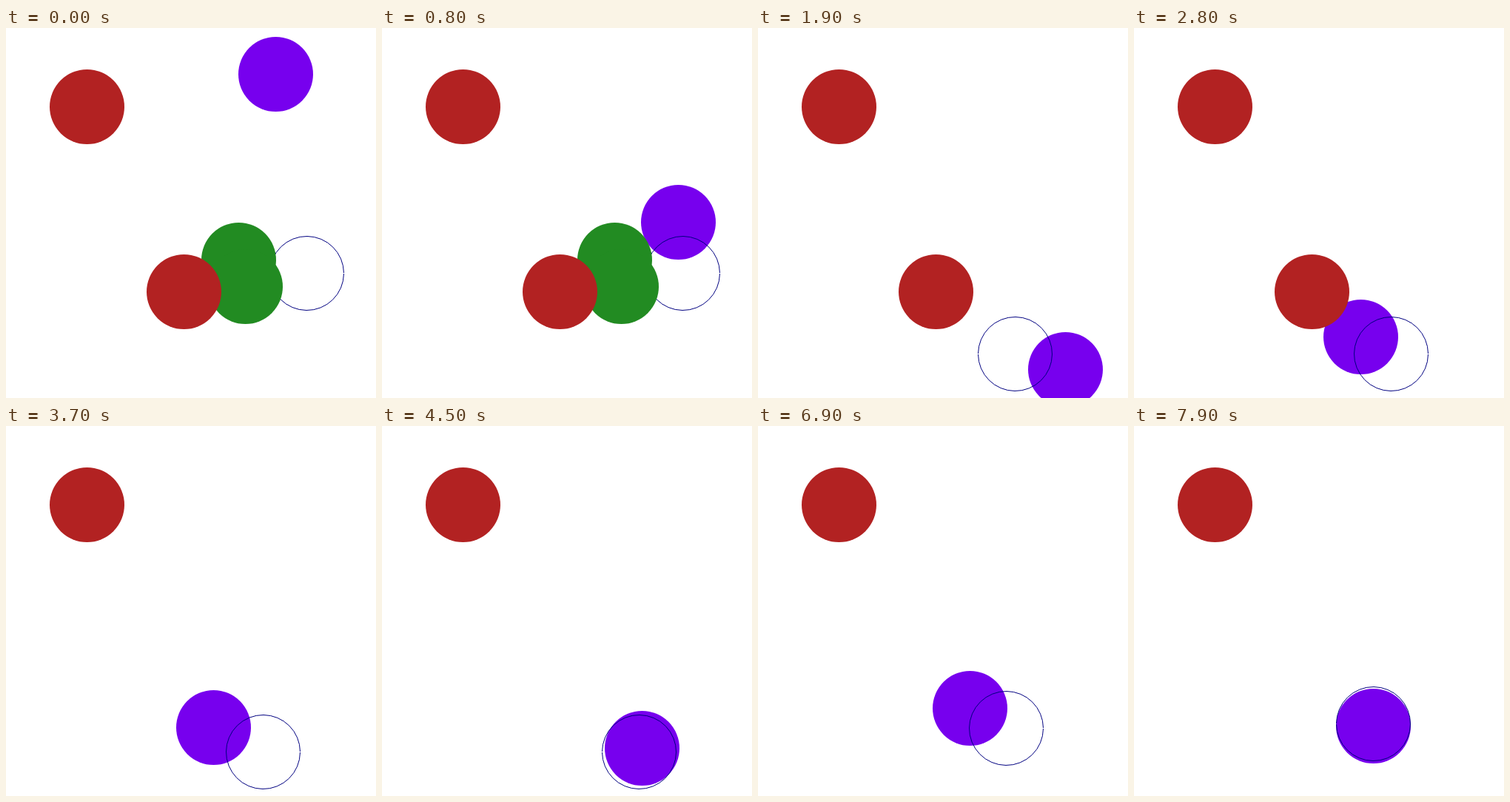
An HTML page with a canvas that plays this animation: 500x500 px, repeating every 8 s.

```html
<!DOCTYPE html>
<html>
<head>
<meta charset="utf-8">
<style>
  html, body { margin: 0; width: 100%; height: 100%; overflow: hidden; background: #fff; }
  canvas { display: block; }
</style>
</head>
<body>
<canvas width="500" height="500"></canvas>
<script>
const ctx = document.querySelector('canvas').getContext('2d');
const STEP = 100, STEPS = 80;

// Places the mover passes: step, x, y
const path = [
  [0, 364.5, 62.5], [4, 376.5, 129], [8, 400.5, 262.5], [11, 420.5, 374],
  [14, 438.5, 459], [16.5, 434, 470], [19, 415.5, 461.5], [28, 306.5, 417.5],
  [34, 274, 404.5], [36, 276.5, 405.5], [45, 351.5, 435.5], [50.4, 390.5, 453.5],
  [54, 382.5, 445.5], [59, 346.5, 421.5], [63, 314.5, 400.5], [69, 286.5, 381.5],
  [72, 291.5, 384.5], [79, 323.5, 405.5]
];

// Ring centres: first step, x, y
const rings = [[0, 406.5, 331.5], [12, 347.5, 440.5], [48, 335.5, 408.5], [75, 323.5, 402.5]];

// Still discs: x, y, colour, step at which they vanish
const discs = [
  [314.5, 313.5, 'forestgreen', 12],
  [323.5, 349.5, 'forestgreen', 12],
  [240.5, 356.5, 'firebrick', 32],
  [109.5, 106.5, 'firebrick', STEPS]
];

const slope = (i, axis) =>
  (path[i + 1][axis] - path[i][axis]) / (path[i + 1][0] - path[i][0]);
const gap = i => path[i + 1][0] - path[i][0];

function tangent(i, axis) {
  const last = path.length - 1;
  if (i === 0) return 1.5 * slope(0, axis) - 0.5 * slope(1, axis);
  if (i === last) return slope(last - 1, axis);
  const a = gap(i - 1), b = gap(i);
  return (slope(i - 1, axis) * b + slope(i, axis) * a) / (a + b);
}

// Cubic Hermite curve through the path, snapped to pixel centres
function place(step, axis) {
  let i = 0;
  while (i < path.length - 2 && path[i + 1][0] <= step) i++;
  const h = gap(i), u = (step - path[i][0]) / h, v = 1 - u;
  const p = path[i][axis] * v * v * (1 + 2 * u) + path[i + 1][axis] * u * u * (1 + 2 * v)
    + h * u * v * (tangent(i, axis) * v - tangent(i + 1, axis) * u);
  return Math.floor(p + 1e-6) + 0.5;
}

function disc(x, y, color) {
  ctx.fillStyle = color;
  ctx.beginPath();
  ctx.arc(x, y, 50.5, 0, 2 * Math.PI);
  ctx.fill();
}

// Thin ring with a tiny opening on the side away from the mover
function ring(x, y, moverX) {
  const start = moverX < x ? 0 : Math.PI;
  ctx.strokeStyle = 'navy';
  ctx.lineWidth = 1;
  ctx.beginPath();
  ctx.arc(x, y, 50, start + 0.01, start + 2 * Math.PI - 0.01);
  ctx.stroke();
}

function draw(now) {
  const step = Math.floor(now / STEP) % STEPS;
  const x = place(step, 1), y = place(step, 2);
  const [, ringX, ringY] = rings.filter(r => r[0] <= step).pop();
  ctx.clearRect(0, 0, 500, 500);
  disc(x, y, '#7700ee');
  ring(ringX, ringY, x);
  for (const [dx, dy, color, end] of discs) if (step < end) disc(dx, dy, color);
}

const begin = performance.now();
function tick() {
  draw(performance.now() - begin);
  requestAnimationFrame(tick);
}
tick();
</script>
</body>
</html>
```
